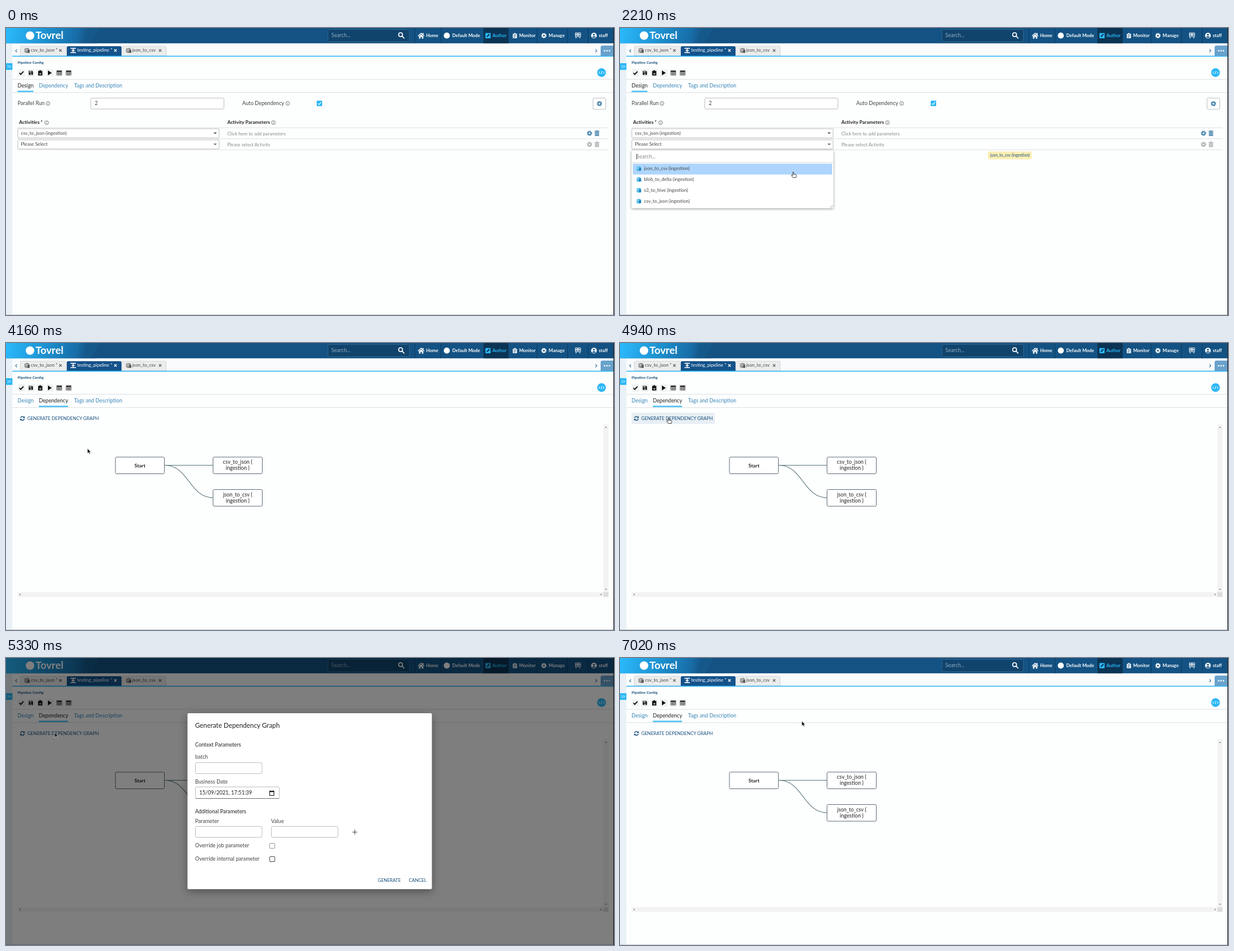
Write an HTML page that moves like this. It is 1000 px wide and 473 px high and loops after 7.93 s.

```html
<!DOCTYPE html>
<html lang="en">
<head>
<meta charset="utf-8">
<title>Pipeline editor</title>
<style>
html, body { margin: 0; width: 100%; height: 100%; overflow: hidden; background: #fdfefe; }
svg { display: block; width: 100%; height: 100%; }
text { font: 7.65px Lato, sans-serif; fill: #444; white-space: pre; }
.m { font-size: 8.66px; }
.nav text { font-size: 7.4px; font-weight: 700; fill: #fff; }
.head text { font-size: 8px; font-weight: 700; fill: #222; }
.hint { fill: #8a8a8a; }
.link { fill: #3a86b8; }
.on { fill: #222; }
.navy { fill: #154f7c; }
.mid { text-anchor: middle; }
.box { fill: #fff; stroke: #b9bcbf; stroke-width: .9; }
.rule { stroke: #dfe1e3; stroke-width: 1; }
.node { fill: #fff; stroke: #66757f; stroke-width: 1; }
.edge { fill: none; stroke: #627d84; stroke-width: 1.2; }
.ln { fill: none; stroke: currentColor; }
.fill { fill: currentColor; }
.blue { color: #4b87ad; }
.pale { color: #b0b4b7; }
.grey { color: #666; }
.cyan { color: #2bb7f6; }
.menu { filter: drop-shadow(0 1px 2px rgba(0,0,0,.4)); }
.card { filter: drop-shadow(0 4px 7px rgba(0,0,0,.35)); }
</style>
</head>
<body>
<svg viewBox="0 0 1000 473">
<defs>
  <linearGradient id="sky" gradientUnits="userSpaceOnUse" x1="0" y1="0" x2="128" y2="28">
    <stop offset="0" stop-color="#2bbafc"/><stop offset=".5" stop-color="#1d91d0"/>
    <stop offset=".9" stop-color="#176ca6"/><stop offset="1" stop-color="#135283"/>
  </linearGradient>
  <g id="gear" class="ln"><circle r="2.4" stroke-width="1.9"/><circle r="3.7" stroke-width="1.4" stroke-dasharray="1.6 1.306"/></g>
  <g id="trash" class="fill"><path d="M-4-3.9h2.4l.6-.8h2l.6.8H4v1.1h-8zM-3.3-2.2h6.6V4.5h-6.6z"/><path d="M-1.3-1V3.3M1.3-1V3.3" stroke="#fff" stroke-width=".7"/></g>
  <g id="info" class="ln" stroke-width=".8"><circle r="3.1"/><path d="M0-.4V1.8M0-1.8v.7"/></g>
  <path id="caret" class="fill" d="M-2.8-1.4h5.6L0 1.5z"/>
  <path id="close" class="ln" stroke-width="1.1" d="M-2-2 2 2M2-2-2 2"/>
  <g id="job"><path d="M-4-3 1-4.2 4-2.5V3L0 4.2-4 3z" fill="#8c8c8c"/><path d="M-2.5-1.5H1.5M-2.5.5H1" stroke="#eee" stroke-width=".8"/><path d="M1-1H4.5V4H1z" fill="#5c5c5c"/></g>
  <g id="item"><path d="M-3.5-3 .5-4 3.5-3V3L.5 4-3.5 3z" fill="#4fb9ea"/><path d="M.4-1.5H3.6V3H.4z" fill="#1f7fb4"/><path d="M-2.4-1.2H0" stroke="#fff" stroke-width=".8"/></g>
  <g id="sheet"><path class="ln" d="M-3.8-3.4h7.6v6.8h-7.6zM-3.8-1.4h7.6M-3.8 1h7.6M-1.2-1.4v4.8M1.4-1.4v4.8" stroke-width=".8"/><path class="fill" d="M-4-3.8h8v2h-8z"/></g>
  <g id="clip"><path class="fill" d="M-3.4-3.2h2L-.8-4.4H.8l.6 1.2h2V4.2h-6.8z"/></g>
  <g id="sync" class="ln" stroke-width="1.3"><path d="M-3.1-.7A3.2 3.2 0 0 1 2.6-1.8M3.1.7A3.2 3.2 0 0 1-2.6 1.8"/><path class="fill" stroke="none" d="M3.8-3.8v3.2H.7zM-3.8 3.8V.6H-.7z"/></g>
</defs>

<rect width="1000" height="473" fill="#fdfefe"/>

<g class="nav">
  <rect width="1000" height="25.5" fill="#135283"/>
  <rect width="150" height="25.5" fill="url(#sky)"/>
  <path d="M128 0h26l-15 25.5h-26z" fill="#1d6ba3" opacity=".25"/>
  <circle cx="39.5" cy="12.5" r="7" fill="#fff"/>
  <text x="48.5" y="18.3" style="font-size:17px">Tovrel</text>
  <rect x="529.5" y="2.5" width="134" height="20" rx="2" fill="#11446d" stroke="#356a93" stroke-width=".8"/>
  <text x="535" y="15.4" style="font-size:8.66px;font-weight:400;fill:#8fabc0">Search...</text>
  <g fill="none" stroke="#fff" stroke-width="1.5"><circle cx="649" cy="11" r="3.2"/><path d="m651.4 13.4 3.8 3.8"/></g>
  <rect x="785" width="41" height="25.5" fill="#0b3353"/>
  <path d="M672.5 0v25.5M715.5 0v25.5M785.5 0v25.5M826.5 0v25.5M873.5 0v25.5M923.5 0v25.5M957.5 0v25.5" stroke="#0d3e64"/>
  <path d="m677.2 12.8 5.6-5 2.3 2V8.2h1.6v3l1.6 1.6-.8.9-4.7-4.2-4.7 4.2zM679.2 13.7l3.6-3.2 3.6 3.2v3.8h-2.5v-3h-2.2v3h-2.5z" fill="#fff"/>
  <text x="691" y="15">Home</text>
  <circle cx="725" cy="12.5" r="5" fill="#fff"/>
  <text x="734" y="15">Default Mode</text>
  <rect x="788.5" y="8.3" width="8.6" height="8.6" rx="1" fill="#2bb7f6"/><path d="m790.5 15 .5-2 3.4-3.4 1.4 1.4-3.4 3.4z" fill="#0b3353"/>
  <text x="800" y="15" style="fill:#2bb7f6">Author</text>
  <g style="color:#fff"><use href="#clip" x="837" y="12.6"/><use href="#gear" x="884.7" y="12.6"/></g>
  <path d="M835 11h4M835 13h4M835 15h3" stroke="#135283" stroke-width=".8"/>
  <text x="844" y="15">Monitor</text>
  <text x="892.5" y="15">Manage</text>
  <path d="M936.5 8h8.5v3h-8.5zM936.5 11h8.5v3.3h-8.5zM937.5 14.3v3M944 14.3v3M938.5 9.5h4M938.5 12.7h4" fill="none" stroke="#fff" stroke-width=".9"/>
  <circle cx="967" cy="12.5" r="4.7" fill="#fff"/><circle cx="967" cy="11" r="1.6" fill="#135283"/><path d="M963.9 15q3.1-3.2 6.2 0-3 2.6-6.2 0" fill="#135283"/>
  <text x="975" y="15">staff</text>
</g>

<rect y="25.5" width="10.5" height="447.5" fill="#e9f1f6"/>
<rect y="58" width="10.5" height="11" fill="#2bb7f6"/>
<path d="m2.5 61.5 2 2-2 2M5.7 61.5l2 2-2 2" fill="none" stroke="#fff"/>
<rect x="10.5" y="25.5" width="989.5" height="21" fill="#fafbfc"/>
<g stroke="#cfd1d3" stroke-width=".8" fill="#ebecec"><path d="M23.5 46V32q0-2 2-2H97q2 0 2 2v14zM191 46V32q0-2 2-2h68.500q2 0 2 2v14z"/></g>
<path d="M100 46V32q0-2 2-2h86q2 0 2 2v14z" fill="#14528a"/>
<path d="M10.500 46.500H999" stroke="#2bb7f6" stroke-width="1.5"/>
<path d="m18 35-2.200 2.400 2.200 2.400M969.500 35l2.200 2.400-2.200 2.400" fill="none" stroke="#2c6b98" stroke-width="1.100"/>
<path d="M978 46V32q0-3 3-3h18v17z" fill="#68a2cc"/>
<path d="M984.500 37.500h.1M988.500 37.500h.1M992.500 37.500h.1" stroke="#fff" stroke-width="2.400" stroke-linecap="round"/>
<use href="#job" x="34.500" y="37"/><use href="#job" x="201.500" y="37"/>
<path d="M106 33.500h9M106 40.500h9M108 37h5M110.500 33.500v7" stroke="#fff" stroke-width="1.300"/>
<text x="41" y="39.400">csv_to_json *</text>
<text x="117" y="39.400" style="fill:#fff">testing_pipeline *</text>
<text x="207.500" y="39.400">json_to_csv</text>
<g class="grey"><use href="#close" x="89.500" y="37"/><use href="#close" x="253.500" y="37"/></g>
<use href="#close" x="180" y="37" style="color:#fff"/>

<text class="navy" x="19" y="59" style="font-size:6.4px;font-weight:700">Pipeline Config</text>
<g fill="#f0f1f2"><rect x="19.500" y="68" width="12" height="12"/><rect x="35" y="68" width="12" height="12"/><rect x="50.500" y="68" width="12" height="12"/><rect x="66" y="68" width="12" height="12"/><rect x="81.500" y="68" width="12" height="12"/><rect x="97" y="68" width="12" height="12"/></g>
<path d="m22 74 2.300 2.400 4.400-4.700" fill="none" stroke="#111" stroke-width="1.700"/>
<path d="M37.500 70.700h5.600l1.200 1.200v5.400h-6.800z" fill="#111"/><path d="M38.700 71.700h3.500v1.500h-3.500zM40 75h2v1.500h-2z" fill="#fff"/>
<use href="#clip" x="56.300" y="74" style="color:#111"/><path d="M55 74.500h2.800v2H55z" fill="#ccc"/>
<path d="m69 70 6.300 4-6.300 4z" fill="#111"/>
<g style="color:#333"><use href="#sheet" x="87.600" y="74"/><use href="#sheet" x="103" y="74"/></g>
<circle cx="979.500" cy="73.500" r="7.200" fill="#2bb7f6"/>
<path d="m977 71.700-2.200 1.900 2.200 1.900M982 71.700l2.200 1.900-2.200 1.900M980.200 71l-1.400 5" fill="none" stroke="#fff" stroke-width=".9"/>
<path class="rule" d="M10.500 84.500H999M10.500 106.500H999"/>
<text class="m link" x="112" y="98.300">Tags and Description</text>

<g data-on="0-3510">
  <text class="m on" x="19" y="98.300">Design</text>
  <text class="m link" x="54" y="98.300">Dependency</text>
  <path d="M19 104.500h26" stroke="#2bb7f6" stroke-width="2"/>
  <text class="m" x="19" y="126.700">Parallel Run</text>
  <rect class="box" x="139.500" y="115.500" width="219" height="18" rx="2"/>
  <text class="m" x="146" y="127.200">2</text>
  <text class="m" x="388.500" y="126.700">Auto Dependency</text>
  <rect x="511" y="119.700" width="9" height="9" rx="1" fill="#2bb7f6"/>
  <path d="m513 124.300 1.900 1.900 3.400-4" fill="none" stroke="#fff" stroke-width="1.100"/>
  <rect class="box" x="965.500" y="115.500" width="21" height="18.500" rx="2"/>
  <use href="#gear" class="blue" x="976" y="124.700"/>
  <g class="grey"><use href="#info" x="69" y="124.300"/><use href="#info" x="463.300" y="124.300"/><use href="#info" x="66.800" y="156"/><use href="#info" x="439.800" y="155.800"/></g>
  <g class="head"><text x="21.500" y="158">Activities *</text><text x="364" y="158">Activity Parameters</text></g>
  <path class="rule" d="M19 164.500H991"/>
  <g id="rows"></g>
</g>

<g class="menu" data-on="910-2470">
  <rect x="19" y="202" width="332" height="95" fill="#fff"/>
  <path class="rule" d="M19 221.500H351"/>
  <rect data-on="1300-2470" x="21" y="223.500" width="328" height="18" fill="#aed5fd"/>
  <text class="m hint" x="27" y="215">Search...</text>
  <path d="M27.500 207.500v9" stroke="#333" stroke-width=".8"/>
  <g id="items"></g>
  <path d="m346 296 4-4M348.500 296l1.500-1.500" stroke="#777" stroke-width=".7"/>
</g>
<g data-on="1820-2600">
  <rect x="605" y="203.500" width="72" height="13" rx="2" fill="#fdefb5"/>
  <text class="navy" x="609" y="212.200" style="font-size:6.6px">json_to_csv (ingestion)</text>
</g>

<g data-on="3510-7930">
  <text class="m link" x="19" y="98.300">Design</text>
  <text class="m on" x="54" y="98.300">Dependency</text>
  <path d="M54 104.500h48" stroke="#2bb7f6" stroke-width="2"/>
  <rect data-on="4810-5330" x="19" y="115" width="137" height="18.500" rx="2" fill="#e8eff4"/>
  <rect data-on="5070-5200" x="29" y="115" width="102" height="18.500" fill="#a9c4d6"/>
  <use href="#sync" x="27" y="124.300" style="color:#154f7c"/>
  <text class="navy" x="35" y="126.900" style="font-size:7.55px">GENERATE DEPENDENCY GRAPH</text>
  <path d="M982.500 134h8.500v276h-8.500zM19 410.500h963.500v8H19z" fill="#f3f3f3"/>
  <path d="M982.500 410.500h8.500v8h-8.500z" fill="#dcdcdc"/>
  <path d="m985 140 1.800-2.200 1.800 2.200zM985 405l1.800 2.200 1.800-2.200zM24 412.700l-2.200 1.800 2.200 1.800zM978 412.700l2.200 1.800-2.200 1.800z" fill="#8a8a8a"/>
  <path class="edge" d="M261 201.500h80M261 201.500C301 201.500 301 255 341 255"/>
  <g class="node"><rect x="180" y="188" width="80.500" height="27.500" rx="2"/><rect x="340.500" y="188" width="81" height="27.500" rx="2"/><rect x="340.500" y="241.500" width="81" height="27.500" rx="2"/></g>
  <g class="mid">
    <text class="m on" x="220.300" y="204.500" style="font-weight:700;font-size:8.4px">Start</text>
    <text class="m on" x="381" y="198.700">csv_to_json (</text><text class="m on" x="381" y="209">ingestion )</text>
    <text class="m on" x="381" y="252.500">json_to_csv (</text><text class="m on" x="381" y="262.800">ingestion )</text>
  </g>
</g>

<path d="M0 472.500H999" stroke="#c9cccd"/>
<path d="M999.500 0V473" stroke="#222"/>

<rect class="fade" width="1000" height="473" fill="#000" fill-opacity=".5"/>
<g class="fade">
  <rect class="card" x="298.500" y="91" width="402" height="290" rx="2" fill="#fff"/>
  <text class="on" x="311" y="115.400" style="font-size:10.86px">Generate Dependency Graph</text>
  <text class="m on" x="311" y="146">Context Parameters</text>
  <text class="m" x="311" y="166.300">batch</text>
  <text class="m" x="311" y="206.600">Business Date</text>
  <text class="m on" x="311" y="255.500">Additional Parameters</text>
  <text class="m" x="311" y="271.500">Parameter</text>
  <text class="m" x="436" y="271.500">Value</text>
  <text class="m" x="311" y="312">Override job parameter</text>
  <text class="m" x="311" y="334">Override internal parameter</text>
  <g class="box"><rect x="311.500" y="172.500" width="109.500" height="18" rx="2"/><rect x="311.500" y="212.500" width="138" height="19" rx="2"/><rect x="311.500" y="277.500" width="109.500" height="18" rx="2"/><rect x="436.500" y="277.500" width="109.500" height="18" rx="2"/></g>
  <path d="M312 231.500h137" stroke="#777"/>
  <text class="m on" x="318" y="225.200">15/09/2021, 17:51:39</text>
  <path d="M433.700 219.500h7v7h-7zM433.500 220.500h7.400M435 218v1.500M439.400 218v1.500" fill="none" stroke="#222" stroke-width="1.100"/>
  <path d="M569.700 287h8M573.700 283v8" stroke="#555" stroke-width="1.100"/>
  <rect x="433.700" y="305.500" width="8.300" height="8.300" rx="1" fill="none" stroke="#999"/>
  <rect x="433.700" y="327.300" width="8.300" height="8.300" rx="1" fill="none" stroke="#444"/>
  <rect data-on="6110-6500" x="607" y="357" width="47" height="19.500" rx="2" fill="#e6eef4"/>
  <text class="navy" x="611.500" y="369.300" style="font-size:7.5px">GENERATE</text>
  <text class="navy" x="662.500" y="369.300" style="font-size:7.5px">CANCEL</text>
</g>

<g id="mouse" data-on="260-7930">
  <path id="arrow" d="M0 0v8l1.900-1.700 1.300 2.700 1.300-.6-1.300-2.600H5.700z" fill="#111" stroke="#fff" stroke-width=".5"/>
  <path id="hand" d="M-.8.800Q0-.5.800.8V4l3.600.8q1 .3.800 1.600L4.500 9.500H-.6L-3 6.300q-.3-1.300.9-1l1.300.9z" fill="#fff" stroke="#222" stroke-width=".8" data-on="520-1040 1300-2600 3380-3900 4810-5200 6110-6500"/>
</g>
</svg>
<script>
const LOOP = 7930, STEP = 130;
const $ = s => document.querySelector(s);
const NAMES = ['json_to_csv', 'blob_to_delta', 's3_to_hive', 'csv_to_json'];

function row(y, on, name, note, active) {
  const tone = active ? 'blue' : 'pale';
  return `<g data-on="${on}">
    <rect class="box" x="19.5" y="${y - 7.5}" width="331" height="15" rx="1"/>
    <text x="24.500" y="${y + 2.1}">${name}</text>
    <use href="#caret" class="grey" x="344" y="${y}"/>
    <text class="hint" x="364" y="${y + 3}">${note}</text>
    <g class="${tone}"><use href="#gear" x="959.7" y="${y}"/><use href="#trash" x="972" y="${y}"/></g>
    <path class="rule" d="M19 ${y + 9}H991"/></g>`;
}
const ADD = 'Click here to add parameters', PICK = 'Please select Activity';
$('#rows').innerHTML =
  row(173.5, '0-3510', 'csv_to_json (ingestion)', ADD, true) +
  row(191.8, '0-2470', 'Please Select', PICK, false) +
  row(191.8, '2470-3510', 'json_to_csv (ingestion)', ADD, true) +
  row(210.1, '2470-3510', 'Please Select', PICK, false);
$('#items').innerHTML = NAMES.map((n, i) => {
  const y = 232 + i * 17.8;
  return `<use href="#item" x="31" y="${y}"/><text x="39.5" y="${y + 2.4}">${n} (ingestion)</text>`;
}).join('');

// time, x, y of the pointer tip
const PATH = [
  [260, 420, 238], [390, 384, 212], [520, 338, 190], [910, 338, 190], [1170, 350, 233],
  [1300, 340, 238], [1690, 285, 237], [2600, 285, 237], [2730, 278, 204], [2860, 278, 204],
  [3380, 79, 94], [3770, 79, 94], [4160, 134, 174], [4420, 134, 174], [4810, 80, 123],
  [5330, 80, 123], [6110, 622, 369], [6760, 622, 369], [7020, 299, 104], [LOOP, 299, 104]
];
// time, dialog opacity held from then on
const FADE = [[0, 0], [5070, .4], [5200, .85], [5330, 1], [6370, .5], [6500, 0]];

const spans = [...document.querySelectorAll('[data-on]')].map(el => ({
  el, on: el.dataset.on.split(' ').map(s => s.split('-').map(Number))
}));
const fades = document.querySelectorAll('.fade');

function pointer(t) {
  const i = PATH.findIndex(p => p[0] > t);
  if (i < 1) return PATH[0].slice(1);
  const [a, ax, ay] = PATH[i - 1], [b, bx, by] = PATH[i];
  const k = (t - a) / (b - a);
  return [ax + (bx - ax) * k, ay + (by - ay) * k];
}

function draw() {
  const t = Math.floor(performance.now() % LOOP / STEP) * STEP;
  for (const { el, on } of spans)
    el.style.display = on.some(([a, b]) => t >= a && t < b) ? '' : 'none';
  $('#arrow').style.display = $('#hand').style.display ? '' : 'none';
  $('#mouse').setAttribute('transform', `translate(${pointer(t)})`);
  const alpha = FADE.filter(f => f[0] <= t).pop()[1];
  fades.forEach(el => el.style.opacity = alpha);
  requestAnimationFrame(draw);
}
draw();
</script>
</body>
</html>
```
